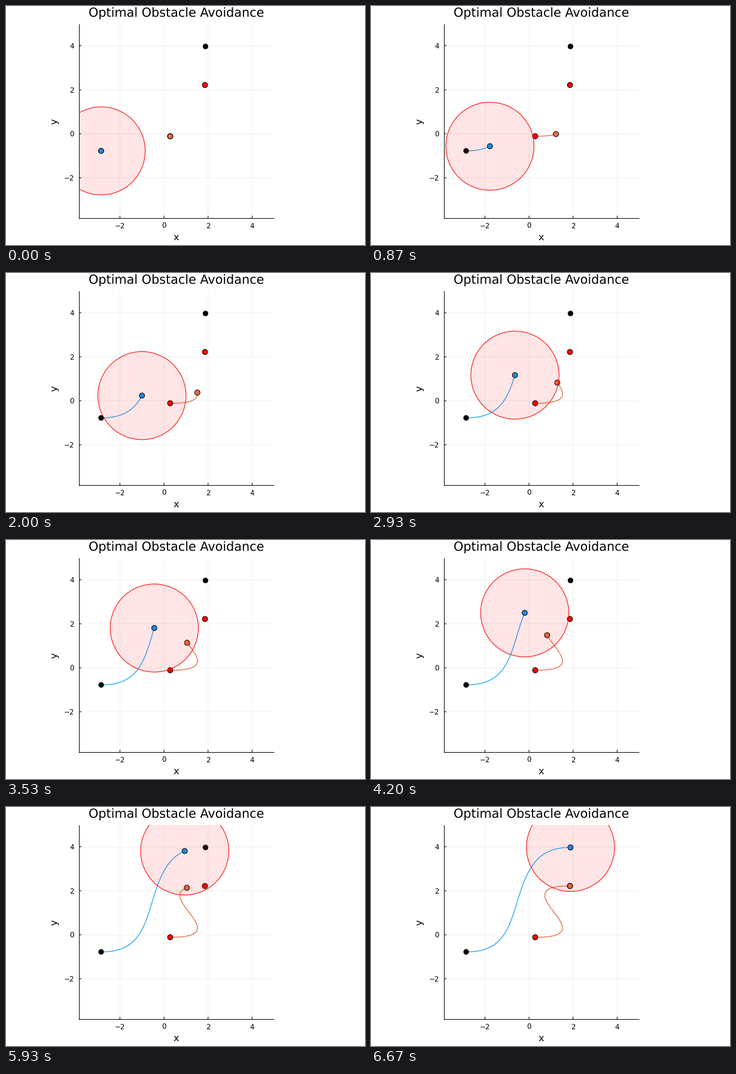
A matplotlib script for the animation above (6.74 s loop, 600 px wide and 400 px high).

```python
import numpy as np
import matplotlib.pyplot as plt
from matplotlib.animation import FuncAnimation
from matplotlib.patches import Circle, Rectangle

W, H, DPI = 600, 400, 100
PT = 72 / DPI                      # points per pixel
STEPS, FPS = 101, 15               # poses along the paths, poses per second
LOOP, TICK = 6740, 20              # ms
UNIT, X0, Y0 = 36.83, 264.05, 213.9
LEFT, RIGHT, TOP, BOTTOM = 122, 447.5, 30, 355
BLUE, ORANGE = (0, 0.6056, 0.9787), (0.8889, 0.4356, 0.2781)
SPEED = 3.9                        # both bodies start and end moving right

plt.rcParams.update({"font.family": "DejaVu Sans", "text.hinting": "none"})


def smooth_path(keys):
    """Clamped cubic spline through (step, x, y) keys, sampled at every step."""
    t, p = np.split(np.array(keys, float), [1], axis=1)
    t = t[:, 0]
    n, h = len(t), np.diff(t)
    d = np.diff(p, axis=0) / h[:, None]
    a, b = np.eye(n), np.tile([SPEED, 0.0], (n, 1))
    for i in range(1, n - 1):
        a[i, i - 1:i + 2] = h[i], 2 * (h[i - 1] + h[i]), h[i - 1]
        b[i] = 3 * (h[i] * d[i - 1] + h[i - 1] * d[i])
    m = np.linalg.solve(a, b)
    f = np.arange(STEPS)
    k = np.clip(np.searchsorted(t, f, side="right") - 1, 0, n - 2)
    s, hk = ((f - t[k]) / h[k])[:, None], h[k][:, None]
    return (p[k] * (1 + 2 * s) * (1 - s) ** 2 + p[k + 1] * s * s * (3 - 2 * s)
            + hk * s * (1 - s) * (m[k] * (1 - s) - m[k + 1] * s))


obstacle = smooth_path([(0, 159, 242.5), (22, 216.2, 221.3), (50, 245.4, 155.2),
                        (78, 276.4, 89.6), (100, 333.4, 67.7)])
agent = smooth_path([(0, 274.4, 218), (13, 309, 214.3), (30, 319.8, 200.1),
                     (63, 294.3, 159.4), (78, 291.4, 143.3), (100, 332.5, 132.2)])

fig = plt.figure(figsize=(W / DPI, H / DPI), dpi=DPI, facecolor="white")
ax = fig.add_axes([0, 0, 1, 1])
ax.set(xlim=(0, W), ylim=(H, 0))
ax.axis("off")


def line(xs, ys, color, width=1.0, z=1, snap=False):
    return ax.plot(xs, ys, color=color, lw=width * PT, zorder=z, snap=snap,
                   solid_capstyle="butt")[0]


def label(x, y, text, px, ha="center", va="baseline", rotation=0):
    ax.text(x, y, text, fontsize=px * PT, ha=ha, va=va, rotation=rotation)


def dot(pos, color, z, r=4.4):
    return ax.add_patch(Circle(pos, r, fc=color, ec="black", lw=PT, zorder=z))


for v in (-2, 0, 2, 4):
    x, y = X0 + v * UNIT, Y0 - v * UNIT
    name = str(v).replace("-", "\u2212")
    line([x, x], [TOP, BOTTOM], "#f0f0f0")
    line([LEFT, RIGHT], [y, y], "#f0f0f0")
    line([x, x], [BOTTOM, BOTTOM - 4], "black", z=2)
    line([LEFT, LEFT + 4], [y, y], "black", z=2)
    label(x, 372, name, 11.7)
    label(113.8, y + 4.7, name, 11.7, ha="right")
line([LEFT, LEFT], [TOP, BOTTOM + 0.5], "black", z=2, snap=True)
line([LEFT, RIGHT], [BOTTOM, BOTTOM], "black", z=2, snap=True)
label(284.4, 18.2, "Optimal Obstacle Avoidance", 20.75)
label(284.7, 391.7, "x", 16.2)
label(82, 192.7, "y", 16.2, va="center", rotation=90)

bodies = []
for path, color, end_color, r, width in ((obstacle, BLUE, "black", 4.1, 1.15),
                                         (agent, ORANGE, "red", 4.4, 1.35)):
    trail = line([], [], color, width, 3)
    for end in (path[0], path[-1]):
        dot(end, end_color, 4, r)
    bodies.append((path, trail, dot(path[0], color, 5)))

zone = Circle(obstacle[0], 2 * UNIT, fc=(1, 0, 0, 0.1), ec="red", lw=1.05 * PT, zorder=6)
ax.add_patch(zone)
zone.set_clip_path(Rectangle((LEFT, TOP), RIGHT - LEFT, BOTTOM + 0.5 - TOP,
                             transform=ax.transData))


def update(tick):
    # the picture holds each pose for 1/FPS s, on a finer clock
    i = min(STEPS - 1, int((tick * TICK + 15) * FPS / 1000))
    for path, trail, marker in bodies:
        trail.set_data(*path[:i + 1].T)
        marker.center = tuple(path[i])
    zone.center = tuple(obstacle[i])
    return zone,


anim = FuncAnimation(fig, update, frames=LOOP // TICK, interval=TICK,
                     repeat=True, repeat_delay=0, blit=False)
plt.show()
```
